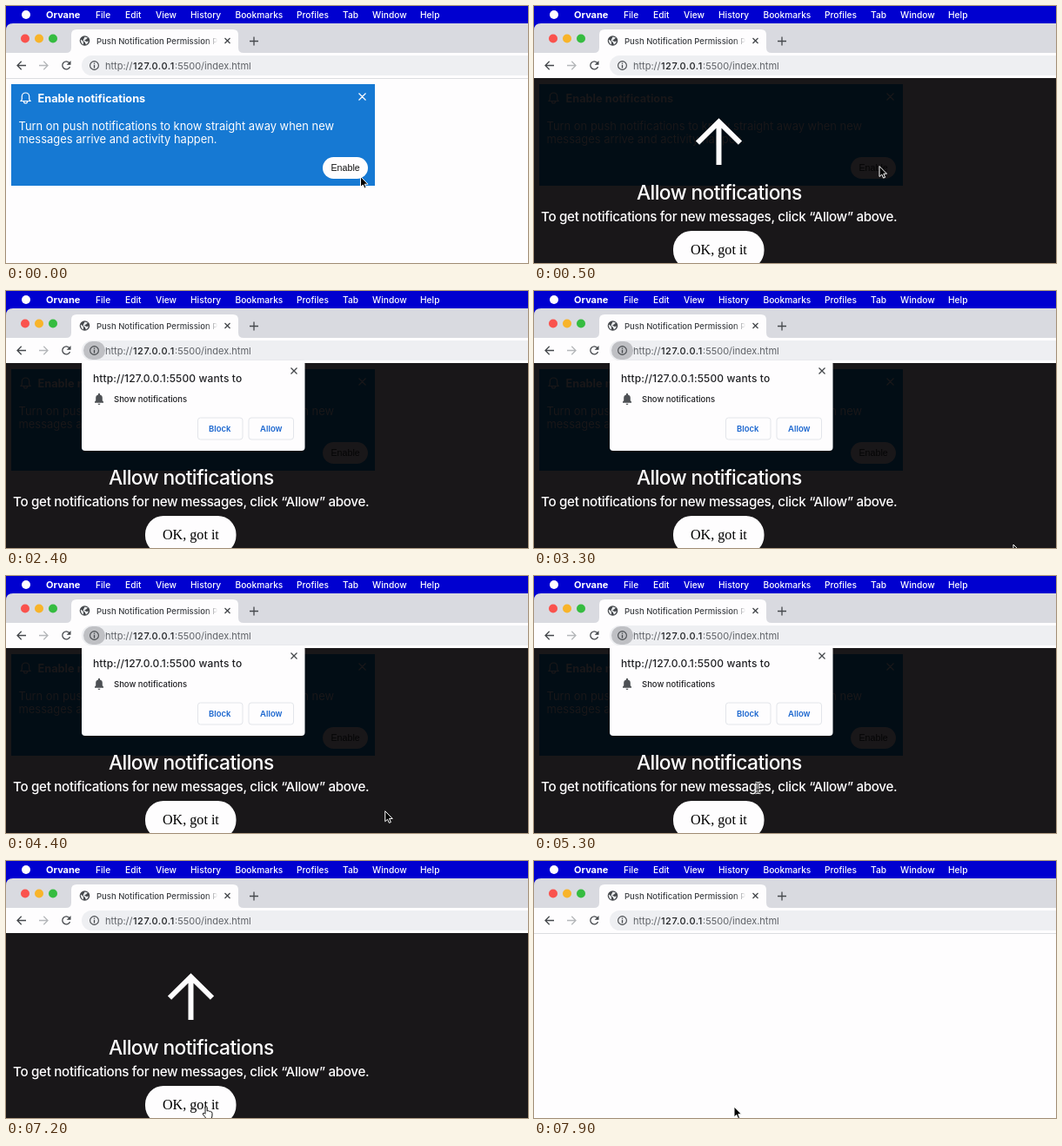
Write an HTML page that moves like this. It is 600x296 px and loops after 8 s.

```html
<!DOCTYPE html>
<html lang="en">
<meta charset="utf-8">
<title>Notification permission</title>
<style>
html, body { margin: 0; width: 100%; height: 100%; overflow: hidden; }
svg { display: block; width: 600px; height: 296px; font-family: Inter, "Open Sans", sans-serif; --paper: #fefdfe; --blue: #1679d3; --ink: #111; --rule: #dcdde0; }
svg.dim { --paper: #191719; --blue: #020d15; --ink: #050506; --rule: #191719; }
.line { fill: none; stroke: #45484c; stroke-width: 1.3; }
.menu { font-size: 10.2px; font-weight: 500; fill: #fff; }
.url { font-size: 11px; fill: #5f6267; }
.btn { font-size: 9.5px; font-weight: 600; fill: #1b66cf; }
.box { fill: #fefdfe; stroke: #e3e5ea; }
.white { fill: #fefdfe; }
.medium { font-weight: 500; }
.paper { fill: var(--paper); }
</style>
<svg id="stage" viewBox="0 0 600 296">
  <defs>
    <linearGradient id="fade">
      <stop offset=".9" stop-color="#3c3f43"/>
      <stop offset="1" stop-color="#3c3f43" stop-opacity="0"/>
    </linearGradient>
    <filter id="shadow" x="-10%" y="-10%" width="120%" height="125%">
      <feDropShadow dx="0" dy="1.5" stdDeviation="1.5" flood-opacity=".2"/>
    </filter>
    <path id="bell" d="M-5 4.2V3L-3.8 1.8V-1.4A3.8 3.8 0 0 1-1-5.1V-5.8A1 1 0 0 1 1-5.8V-5.1A3.8 3.8 0 0 1 3.8-1.4V1.8L5 3V4.2ZM-1.4 5.2H1.4A1.4 1.4 0 0 1-1.4 5.2Z"/>
    <path id="bar" d="M-3-6Q0-6 0-4Q0-6 3-6M0-4V4M-3 6Q0 6 0 4Q0 6 3 6M-1.5 2H1.5"/>
  </defs>

  <rect class="paper" width="600" height="296"/>

  <g id="banner">
    <rect x="6" y="90" width="418" height="117" fill="var(--blue)"/>
    <path d="M17 109.5L18.3 107.5V104.2A4.2 4.2 0 0 1 26.7 104.2V107.5L28 109.5ZM20.5 110A2 2 0 0 0 24.5 110M405.5 100.5L413.5 108.5M413.5 100.5L405.5 108.5" fill="none" stroke="var(--paper)" stroke-width="1.2"/>
    <g class="paper">
      <text x="36.5" y="110.5" font-size="12.75" font-weight="700">Enable notifications</text>
      <g font-size="12.93">
        <text x="14.5" y="143">Turn on push notifications to know straight away when new</text>
        <text x="14.5" y="158">messages arrive and activity happen.</text>
      </g>
      <rect x="364" y="174" width="52" height="25" rx="12.5"/>
    </g>
    <text x="373.5" y="190" font-family="Liberation Sans, Arial, sans-serif" font-size="10.67" fill="var(--ink)">Enable</text>
  </g>

  <g id="overlay">
    <path d="M188 157.7L212.5 133.4L237 157.7M212.5 135V183" fill="none" stroke="#fefdfe" stroke-width="6"/>
    <g class="white">
      <text class="medium" x="118" y="223" font-size="22.8" letter-spacing="-.6">Allow notifications</text>
      <text class="medium" x="8" y="248" font-size="15.2" letter-spacing="-.32">To get notifications for new messages, click “Allow” above.</text>
      <rect x="160" y="259" width="104.5" height="44" rx="21"/>
    </g>
    <text x="180" y="286" font-family="Liberation Serif, serif" font-size="16.1">OK, got it</text>
  </g>

  <rect width="600" height="30" fill="#0000d0"/>
  <circle class="white" cx="23" cy="10" r="5"/>
  <g id="menu" class="menu"></g>
  <path d="M0 54V28Q0 20 8 20H600V54Z" fill="#d9dae0"/>
  <circle cx="22" cy="37.5" r="5" fill="#fa524d"/>
  <circle cx="38" cy="37.5" r="5" fill="#f8b42a"/>
  <circle cx="54" cy="37.5" r="5" fill="#35bc40"/>
  <path d="M69 54Q75 54 75 48V33Q75 27 81 27H261Q267 27 267 33V48Q267 54 273 54H600V83H0V54Z" fill="#fefdfe"/>
  <path d="M0 83.5H600" stroke="var(--rule)"/>
  <circle cx="90.5" cy="40" r="5.8" fill="#45484c"/>
  <path d="M86 38.5L89 41V44.5Q86 43 85.8 40ZM90.5 35.5L94 36.5L92 38.5L90 39.5L92.5 41L95 40.5Q94 43.5 92 44.5L90.8 42L88.5 39.5Z" fill="#eceef0"/>
  <text class="medium" x="104" y="43.7" font-size="9.5" fill="url(#fade)">Push Notification Permission P</text>
  <path class="line" d="M251.5 37L257.5 43M257.5 37L251.5 43M280 40.5H290M285 35.5V45.5"/>
  <path class="line" d="M23 68.5H13M17.7 63.7L13 68.5L17.7 73.3"/>
  <path class="line" d="M38 68.5H48M43.3 63.7L48 68.5L43.3 73.3" style="stroke:#b5b7ba"/>
  <path class="line" d="M73 65.8A4.5 4.5 0 1 0 73.5 70"/>
  <path d="M74.5 63V67.8H69.7Z" fill="#45484c"/>
  <rect x="87" y="57" width="540" height="23" rx="11.5" fill="#eeeff2"/>
  <rect id="chip" x="89" y="58" width="25" height="21" rx="10.5" fill="#bfc0c4"/>
  <circle class="line" cx="101.5" cy="68.5" r="4.9" style="stroke-width:1.1"/>
  <path class="line" d="M101.5 67.8V71.5M101.5 65.5V66.8"/>
  <g class="url">
    <text x="114" y="72.5">http://</text>
    <text class="medium" x="146" y="72.5" letter-spacing=".55" style="fill:#1d1f22">127.0.0.1</text>
    <text x="194" y="72.5">:5500/index.html</text>
  </g>

  <g id="prompt">
    <rect class="white" x="87" y="80" width="256.5" height="104" rx="4" filter="url(#shadow)"/>
    <path class="line" d="M327.5 88.5L334.5 95.5M334.5 88.5L327.5 95.5"/>
    <g class="medium" fill="#202124">
      <text x="100" y="105" font-size="12" letter-spacing=".12">http://127.0.0.1:5500 wants to</text>
      <text x="124" y="128" font-size="9.5">Show notifications</text>
    </g>
    <use href="#bell" x="107" y="124.5" fill="#4d5054"/>
    <rect class="box" x="220.5" y="146" width="51.5" height="25" rx="3"/>
    <rect class="box" x="279" y="146" width="51.5" height="25" rx="3"/>
    <text class="btn" x="233" y="162">Block</text>
    <text class="btn" x="292" y="162">Allow</text>
  </g>

  <g id="cursor" stroke-linejoin="round">
    <path id="arrow" d="M0 0V12L2.8 9.5L4.6 13.6L6.6 12.8L4.8 8.7H8.5Z" fill="#000" stroke="#fff"/>
    <g id="beam" fill="none">
      <use href="#bar" stroke="#fff" stroke-width="2.6"/>
      <use href="#bar" stroke="#111"/>
    </g>
    <path id="hand" d="M-1 8V1Q-1-.5 0-.5T1.2 1V5Q2.5 4 3.4 5.3Q4.7 4.5 5.4 5.9Q7 5.5 7 7.5V10Q7 12 5.7 14H0Q-1 11.5-3.5 9Q-4.2 7.5-3 7.3T-1 8.5" fill="#fff" stroke="#111"/>
  </g>
</svg>
<script>
const $ = id => document.getElementById(id);
const LOOP = 8000, OVERLAY = 500, PROMPT = 800, ANSWER = 6500, DISMISS = 7500;

const menu = [["Orvane", 46], ["File", 103], ["Edit", 137], ["View", 172], ["History", 212],
  ["Bookmarks", 263.5], ["Profiles", 334], ["Tab", 387], ["Window", 421], ["Help", 476]];
$("menu").innerHTML = menu.map(([name, x], i) =>
  `<text x="${x}" y="13.5"${i ? "" : ' style="font-weight:700;font-size:11px"'}>${name}</text>`).join("");

// Pointer stops: time, x, y
const stops = [[0, 407.5, 196.5], [300, 397, 184.5], [1300, 397, 184.5], [1600, 430, 244], [1700, 455, 312],
  [2300, 556, 312], [2700, 583, 272], [3300, 551, 292], [3400, 520, 312], [3900, 508, 305],
  [4500, 430, 268], [5300, 257.5, 244], [5800, 304, 161], [6500, 304, 161],
  [7000, 230, 283], [LOOP, 230, 283]];

function pointer(t) {
  const i = stops.findIndex(s => s[0] > t), [t0, x0, y0] = stops[i - 1], [t1, x1, y1] = stops[i];
  const k = (t - t0) / (t1 - t0), e = k * k * (3 - 2 * k);
  return [x0 + (x1 - x0) * e, y0 + (y1 - y0) * e];
}

const show = (id, on) => $(id).style.display = on ? "" : "none";

function draw(now) {
  const t = Math.floor(now % LOOP / 100) * 100;
  const dim = t >= OVERLAY && t < DISMISS, asking = t >= PROMPT && t < ANSWER;
  $("stage").classList.toggle("dim", dim);
  show("banner", t < ANSWER);
  show("overlay", dim);
  show("prompt", asking);
  show("chip", asking);

  const [x, y] = pointer(t);
  const onOk = dim && x > 160 && x < 265 && y > 259;
  const onText = dim && x > 8 && x < 417 && y > 233 && y < 253;
  $("cursor").setAttribute("transform", `translate(${x} ${y})`);
  show("hand", onOk);
  show("beam", onText);
  show("arrow", !onOk && !onText);
  requestAnimationFrame(draw);
}
requestAnimationFrame(draw);
</script>
</html>
```
